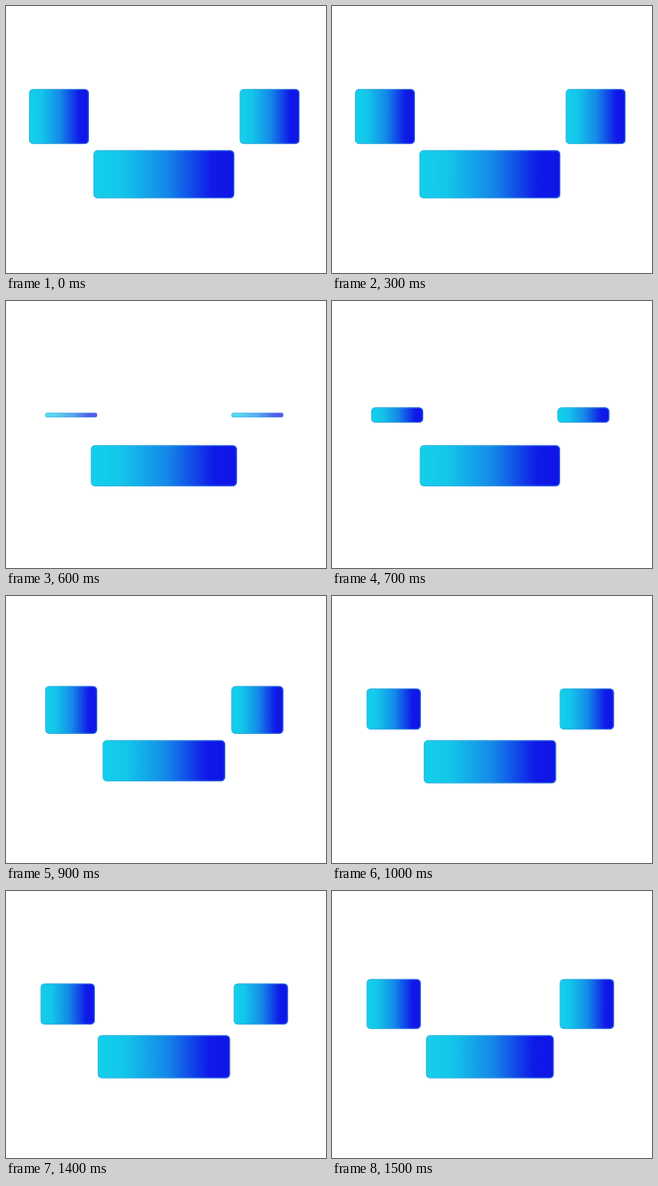
These frames come from a looping animation (432 by 360 pixels, 1.6 s). An HTML page with a canvas:

```html
<!DOCTYPE html>
<html>
<head>
<meta charset="utf-8">
<style>
html, body { margin: 0; height: 100%; overflow: hidden; background: #fff; }
canvas { display: block; }
</style>
</head>
<body>
<canvas width="432" height="360"></canvas>
<script>
const ctx = document.querySelector('canvas').getContext('2d');
const STEP = 100, STEPS = 16, CENTER = 213.7, WIDE_MOUTH = 197.5;

// The face rests large, then blinks twice at smaller sizes
const rest = { eye: 81, blinkAt: 0, depth: 0 };
const firstBlink = { eye: 70.5, blinkAt: 6, depth: 0.9 };
const secondBlink = { eye: 73.5, blinkAt: 12, depth: 0.7 };

function block(centerX, top, w, h) {
  const x = centerX - w / 2;
  const fill = ctx.createLinearGradient(x, 0, x + w, 0);
  fill.addColorStop(0, '#13d0ea');
  fill.addColorStop(0.2, '#13c6ea');
  fill.addColorStop(0.52, '#1488e8');
  fill.addColorStop(0.84, '#0f1ae8');
  fill.addColorStop(1, '#0f14e6');
  ctx.save();
  ctx.globalAlpha = Math.min(1, h / 9);
  ctx.beginPath();
  ctx.roundRect(x, top, w, h, Math.min(6, h / 2));
  ctx.clip();
  ctx.fillStyle = fill;
  ctx.fillRect(x, top, w, h);
  // Soft lighter rim, kept inside by the clip
  ctx.strokeStyle = 'rgba(70, 165, 220, 0.5)';
  ctx.lineWidth = 3;
  ctx.stroke();
  ctx.restore();
}

function draw(now) {
  const step = Math.floor(now / STEP) % STEPS;
  const { eye, blinkAt, depth } = step < 4 ? rest : step < 10 ? firstBlink : secondBlink;
  const distance = Math.min(3, Math.abs(step - blinkAt));
  const blink = depth && Math.cos(distance * Math.PI / 6) ** 2;

  // The whole layout follows from the eye size
  const spread = 15 + 1.57 * eye;
  const eyeY = 185.2 - 0.447 * eye;
  const eyeH = 0.92 * eye * (1 - depth * blink);
  const mouthW = 2.35 * eye + (WIDE_MOUTH - 2.35 * eye) * blink;

  ctx.clearRect(0, 0, 432, 360);
  for (const side of [-1, 1]) block(CENTER + side * spread, eyeY - eyeH / 2, eye, eyeH);
  block(CENTER - 0.5, 194.3, mouthW, 0.9 * eye - 7.8);
}

const start = performance.now();
(function loop() {
  draw(performance.now() - start);
  requestAnimationFrame(loop);
})();
</script>
</body>
</html>
```
